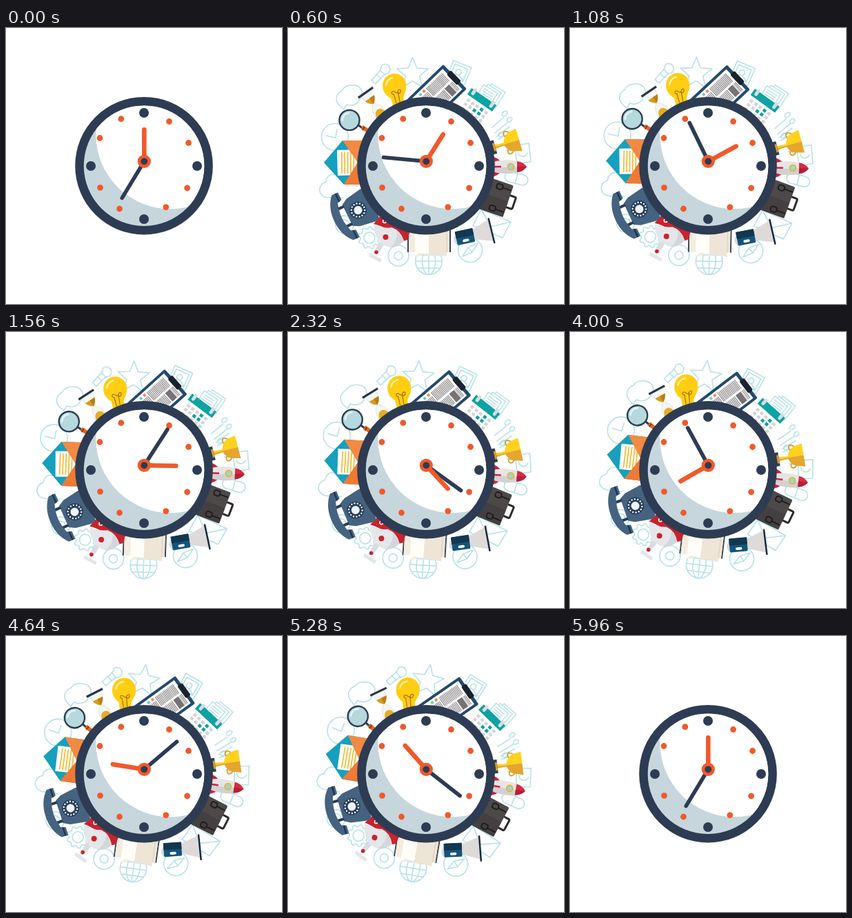
An HTML page that plays this animation: 400 by 400 pixels, repeating every 6 s.

```html
<!DOCTYPE html>
<html lang="en">
<head>
<meta charset="utf-8">
<title>Working hours</title>
<style>
html, body { margin: 0; width: 100%; height: 100%; overflow: hidden; background: #fff; }
svg { display: block; width: 100vw; height: 100vh; }
.line { fill: none; stroke: #b7e2e8; stroke-width: 1.6; stroke-linejoin: round; stroke-linecap: round; }
.navy { fill: #2d3c53; }
.orange { fill: #f1592a; }
</style>
</head>
<body>
<svg viewBox="0 0 400 400">
<g id="ring">
  <!-- outlined icons -->
  <g class="line">
    <path id="star"/>
    <path d="M136 54a7.5 7.5 0 1 1 9 12l-5 1-13 14-6-5 13-15zM133 61l8 7M128 67l7 6"/>
    <path d="M76 114c-9-8-7-18 2-23 3-7 12-9 19-8 10 2 13 11 8 18-2 9-12 13-20 10l-4 7z"/>
    <circle cx="68" cy="158" r="19.5"/><path d="M55 156l14 3 2-12"/>
    <path d="M80 246H59c-9 0-14-7-13-13 1-7 6-9 9-10 0-7 6-12 12-11 7 0 10 5 11 9"/>
    <circle cx="82" cy="285" r="13"/><circle cx="82" cy="285" r="7"/>
    <path id="gear"/><circle cx="118" cy="304" r="8"/>
    <circle cx="160" cy="330" r="15"/><circle cx="160" cy="330" r="6"/>
    <circle cx="204" cy="338" r="19.3"/><ellipse cx="204" cy="338" rx="9.5" ry="19.3"/>
    <path d="M204 318v39M185 338h38M188 329h32M188 348h32"/>
    <circle cx="264" cy="322" r="17.5"/><path d="M253 331l8-13 14-6-8 13zM261 318l6 7"/>
    <path d="M280 263l43 18-12 23-43-18zM280 263l14 25 29-7M304 301l6 3"/>
    <g transform="translate(331 218) rotate(14)"><rect x="-17" y="-7.5" width="34" height="15" rx="7.5"/><path d="M0-7v14"/></g>
    <path d="M328 171l21-4 3 27-20 3zM333 180c2 7 10 9 14 1M316 177l9 1"/>
    <path d="M296 144l16-14M300 152l18-15M303 157l18-14M305 161l19-9"/>
    <ellipse cx="314" cy="124" rx="4.5" ry="3" transform="rotate(-40 314 124)"/>
    <ellipse cx="321" cy="133" rx="4" ry="3" transform="rotate(-40 321 133)"/>
    <ellipse cx="309" cy="154" rx="4.5" ry="3" transform="rotate(-35 309 154)"/>
    <g transform="translate(289 94) rotate(32) scale(.9)">
      <path d="M-12-8H14V22H-12zM-7-8v-4H19V17h-5M-2-12v-4H24V13h-5"/>
      <path d="M-8-3H10M-8 1H10M-8 5H10M-8 9H10M-8 13H10"/>
    </g>
    <g transform="translate(247 64) rotate(22)"><path d="M-13-13H15V14H-13zM-9-9H11V10H-9z"/><circle r="4"/><path d="M-8 9q8-10 18 0"/></g>
  </g>

  <!-- hourglass -->
  <g transform="translate(124 110) rotate(-35)">
    <path d="M-9-19H9Q9-6 1 0q8 6 8 19H-9Q-9 6-1 0-9-6-9-19z" fill="#f5f5f1" stroke="#dfe8e8"/>
    <path d="M-8-10H8Q6-4 0 0-6-4-8-10z" fill="#d99a1c"/><path d="M0-10H8Q6-4 0 0z" fill="#bb7d13"/>
    <path d="M-8 19q2-9 8-9t8 9z" fill="#e5ad22"/>
    <path d="M-13-20H13" stroke="#29364c" stroke-width="3.2"/>
  </g>

  <!-- bulb -->
  <g transform="translate(-.8 1)">
    <path d="M154 115l-4-14c-6-3-12-9-12-18a17 17 0 0 1 34-2c1 9-3 13-4 19l3 13z" fill="#ffce12"/>
    <path d="M143 82a12 12 0 0 1 9-11" fill="none" stroke="#fff0a5" stroke-width="2.4" stroke-linecap="round"/>
    <path d="M158 108l-4-13c-4 1-4-5 0-4s5 4 6 0 5-4 4 0-4 3-4 0M163 106l-3-14" fill="none" stroke="#a96d11" stroke-width="1.2"/>
  </g>

  <!-- clipboard -->
  <g transform="translate(242 70.5) rotate(46)">
    <rect x="-24.5" width="49" height="76" rx="2" fill="#244a6c"/>
    <path d="M-20.5 5H20.5V71H-20.5z" fill="#fff"/>
    <g stroke="#8f898b" stroke-width="16" stroke-dasharray="1.2 1">
      <path d="M-9 10V43M-4 44V68"/><path d="M10 8V13M10 25V68"/>
    </g>
    <path d="M2 14H18V23H2z" fill="#777276"/>
    <path d="M-18 45h4v4h-4z" fill="#ef8a65"/><path d="M-18 52h4v4h-4z" fill="#79c5cc"/>
    <rect x="-11" y="-2" width="22" height="8.5" rx="2.5" fill="#1c222d"/>
  </g>

  <!-- calendar -->
  <g transform="translate(281 104) rotate(35)">
    <path d="M-22 0H22V42H-22z" fill="#fff"/>
    <path d="M-18 12H18M-18 19H18M-18 26H18M-18 33H18" stroke="#d4d5d7" stroke-width="4.5" stroke-dasharray="4.8 3"/>
    <path d="M5.4 12h4.8M5.4 19h4.8M-2.4 19h4.8" stroke="#0da3a2" stroke-width="4.5"/>
    <path d="M-22-5.5H22V5.5H-22z" fill="#0da3a2"/>
    <path d="M-16-6V0M16-6V0" stroke="#d7dce0" stroke-width="5" stroke-linecap="round"/>
  </g>

  <!-- trophy -->
  <g transform="translate(297.5 173) rotate(-16.5)">
    <path d="M28-14c-8-8-12 1-5 6M28 12c-8 10-14-1-5-5" fill="none" stroke="#d99c2e" stroke-width="1.8"/>
    <path d="M2-3L16-2q3-10 12-13l11-2V0H2z" fill="#ffd21c"/>
    <path d="M2 0H39V17L28 14q-9-2-12-12L2 3z" fill="#e4a62c"/>
    <path d="M-5-10H3V10H-5z" fill="#2c3d56"/><path d="M0-6H3V6H0z" fill="#d99c2e"/>
  </g>

  <!-- rocket -->
  <path d="M293 186q12 1 17 10l-15 1zM293 216q12-1 17-10l-15-1z" fill="#cf223b"/>
  <path d="M296 194q20-5 36-1l1 16q-18 5-37-1z" fill="#e7e4e5"/>
  <path d="M296 202h37v7q-18 5-37-1z" fill="#d3d0d3"/>
  <path d="M332 193q9 1 14 8-5 7-14 8z" fill="#d72b45"/><path d="M332 201h14q-5 7-14 8z" fill="#b71e37"/>
  <path d="M294 201h15" stroke="#cf223b" stroke-width="2.5"/>
  <circle cx="323" cy="201" r="4.5" fill="#9cd4df" stroke="#e7b92d" stroke-width="2"/>

  <!-- briefcase -->
  <g transform="translate(304 246) rotate(19)">
    <path d="M15-9h8q2 0 2 2V7q0 2-2 2h-8" fill="none" stroke="#2f2b2d" stroke-width="3"/>
    <rect x="-22" y="-24" width="38" height="48" rx="2" fill="#4d4949"/>
    <path d="M-22 0H16V24H-22z" fill="#444041"/>
    <g fill="none" stroke="#1e1b1d" stroke-width="1.8"><path d="M2-16H15M2 17H15"/>
      <rect x="-7" y="-20" width="9" height="7.5" rx="3"/><rect x="-7" y="13" width="9" height="7.5" rx="3"/></g>
  </g>

  <!-- megaphone -->
  <path d="M266 293l25-16 8 32-31-3z" fill="#dedada"/>
  <path d="M290.7 276.5l8.5 34.5" stroke="#152c40" stroke-width="2.5" stroke-linecap="round"/>
  <g transform="translate(256.5 302.5) rotate(-12)">
    <path d="M-14-5h3V9h-3q-6-7 0-14z" fill="#d8dadd"/>
    <rect x="-13" y="-10" width="26" height="20" rx="1.5" fill="#15547a"/>
    <path d="M-13-10H13V0H-13z" fill="#123750"/>
    <rect x="-4.5" y="3.5" width="9.5" height="3.8" rx="1.9" fill="#fff"/>
  </g>

  <!-- book -->
  <path d="M174 285V325M235 285V325" stroke="#3a4654" stroke-width="2"/>
  <path d="M175 285H204V330l-5-3-7 3-8 2V325H175z" fill="#f4ecdf"/>
  <path d="M184 285H204V327l-14-1-6 5z" fill="#fffdf8"/>
  <path d="M204 285H234V325l-4 0v6l-13-2-13 1z" fill="#eee5d7"/>
  <path d="M230 285V325" stroke="#d9cfbf"/>

  <!-- lamp -->
  <path d="M142 303l-14 22" stroke="#d9dde1" stroke-width="7"/>
  <path d="M118 326l18 9-2 5-17-9z" fill="#e3e6e9"/>
  <path d="M124 284l10-12 45 15-6 20-6 2q-20-20-43-25z" fill="#cb222d"/>
  <path d="M124 285q15 6 26 4 13 4 18 19-7 10-20 10-22-4-24-33z" fill="#e4e7ea"/>
  <path d="M158 293l10 15q-7 10-20 10 11-8 10-25z" fill="#d3d7dc"/>
  <circle cx="140" cy="280" r="2.4" fill="none" stroke="#fff" stroke-width="1.5"/>
  <circle cx="141.5" cy="303" r="4" fill="#cb222d"/><circle cx="128" cy="325" r="2.8" fill="#cb222d"/>

  <!-- telephone -->
  <g transform="translate(101.5 264) rotate(-26)">
    <path d="M-17-17L-8-22 16-26q7 0 7 6V20q0 6-7 6L-8 22-17 17z" fill="#456380"/>
    <path d="M-25-14h9M-25 14h9" stroke="#263d58" stroke-width="4"/>
    <path d="M-15-36H-25Q-38-22-38 0-38 22-25 36H-15V24L-22 22Q-26 10-26 0-26-10-22-22L-15-24z" fill="#456380"/>
    <path d="M-19-36V-23M-19 36V23" stroke="#1f354e" stroke-width="2.4"/>
    <circle r="12.5" fill="#29405b"/>
    <circle r="9.8" fill="none" stroke="#fff" stroke-width="2.4" stroke-linecap="round" stroke-dasharray="0 4.4"/>
    <circle r="6" fill="#edf3f8"/>
  </g>

  <!-- envelope -->
  <path d="M52 195l27-32 28 0V227H81z" fill="#16a0be"/>
  <path d="M71 177l30-1V213l-29 1z" fill="#fff"/>
  <path d="M78 180V211M82.3 180V211M86.6 180V211M90.9 180V211M95.2 180V211" stroke="#f3bd3c" stroke-width="1.8"/>
  <path d="M79 163h29V227H81l20-32z" fill="#f28a43"/><path d="M81 227l20-32 7 0V227z" fill="#ee7a35"/>

  <!-- magnifier -->
  <path d="M102 141l6 4" stroke="#2d3c53" stroke-width="3"/>
  <path d="M107 143.5l13 8" stroke="#e5651f" stroke-width="6"/><path d="M111 143l-3 5" stroke="#8d3a16" stroke-width="2"/>
  <circle cx="89" cy="133.5" r="14.6" fill="#b5d9dc" stroke="#2d3c53" stroke-width="2.4"/>
  <path d="M79 134a10 10 0 0 1 9-11" fill="none" stroke="#e6f5f6" stroke-width="2.4" stroke-linecap="round"/>
</g>

<!-- clock -->
<circle cx="200" cy="199.7" r="99.8" class="navy"/>
<clipPath id="face"><circle cx="200" cy="199.7" r="87.3"/></clipPath>
<g clip-path="url(#face)">
  <path d="M100 100H300V300H100z" fill="#c6d6dc"/>
  <circle cx="238" cy="154.5" r="107.7" fill="#fff"/>
</g>
<g id="dots"></g>
<g stroke-linecap="round">
  <path id="minute" d="M200.3 193.3v-62" stroke="#2d3c53" stroke-width="5.6"/>
  <path id="hour" d="M200.3 193.3v-46" stroke="#f1592a" stroke-width="6.6"/>
</g>
<circle cx="200.3" cy="193.3" r="9.6" class="orange"/>
<circle cx="200.3" cy="193.3" r="4.9" class="navy"/>
</svg>
<script>
const $ = id => document.getElementById(id);
const LOOP = 6000, STEP = 40;

// Closed outline through n points; radius(i) gives each point's distance.
function radial(x, y, n, radius) {
  const points = Array.from({ length: n }, (_, i) => {
    const a = i / n * 2 * Math.PI;
    return [x + radius(i) * Math.sin(a), y - radius(i) * Math.cos(a)];
  });
  return 'M' + points.join('L') + 'Z';
}
$('star').setAttribute('d', radial(180.5, 66.5, 10, i => i % 2 ? 10.5 : 24));
$('gear').setAttribute('d', radial(118, 304, 36, i => i % 4 < 2 ? 16 : 13));

const dot = (x, y, r, name) => `<circle cx="${x}" cy="${y}" r="${r}" class="${name}"/>`;
$('dots').innerHTML =
  [[200, 123], [277, 200], [200, 277], [123, 200]].map(([x, y]) => dot(x, y, 7, 'navy')).join('') +
  [[236.5, 135.5], [264.5, 166.5], [262.6, 231.8], [231.8, 259.6],
   [164.5, 262], [136.5, 231.3], [136, 159.5], [166.8, 131.7]].map(([x, y]) => dot(x, y, 4.4, 'orange')).join('');

const clamp = v => Math.min(1, Math.max(0, v));
const backIn = (u, s) => u * u * ((s + 1) * u - s);

function ringScale(t) {
  const enter = 1 - backIn(1 - clamp((t - 40) / 560), 0.9);
  return enter - backIn(clamp((t - 5280) / 500), 1.70158);
}

function draw(now) {
  const t = Math.floor(now % LOOP / STEP) * STEP;
  const p = clamp((t - 75) / 5885);
  const s = ringScale(t);
  $('hour').setAttribute('transform', `rotate(${360 * p} 200.3 193.3)`);
  $('minute').setAttribute('transform', `rotate(${211.2 + 720 * p} 200.3 193.3)`);
  $('ring').setAttribute('transform',
    `translate(200 200) scale(${Math.max(s, 0)}) rotate(${(t - 600) * 0.002}) translate(-200 -200)`);
  $('ring').style.display = s > 0.6 ? '' : 'none';
}

const start = performance.now();
function tick() {
  draw(performance.now() - start);
  requestAnimationFrame(tick);
}
tick();
</script>
</body>
</html>
```
